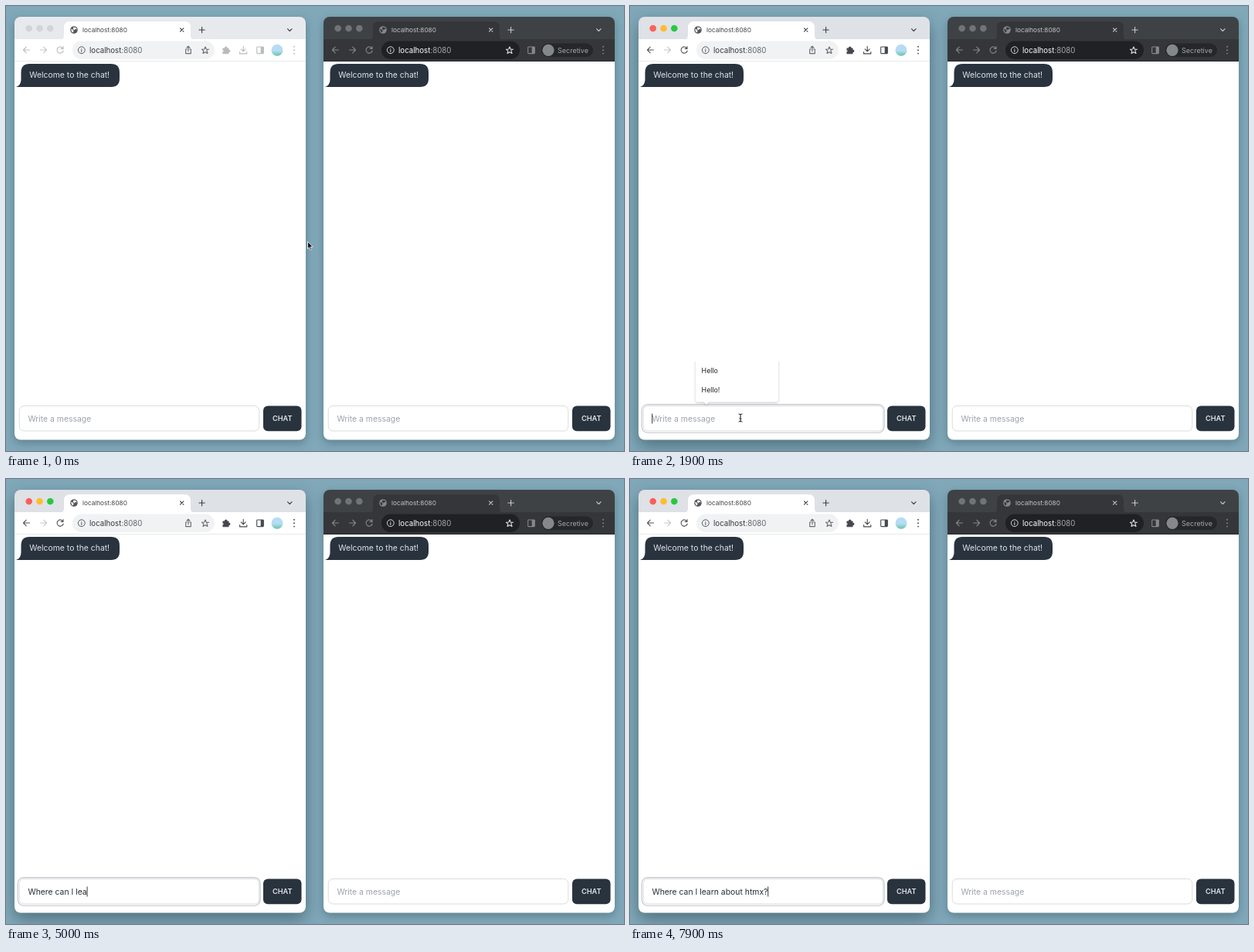
Recreate the animation shown at these times as an HTML page. Size 800 by 577 pixels, loop 8000 ms.

```html
<!DOCTYPE html>
<html lang="en">
<head>
<meta charset="utf-8">
<title>Chat demo</title>
<style>
  html, body { margin: 0; width: 100%; height: 100%; overflow: hidden; background: #80a8b9; }
  svg { display: block; width: 100%; height: 100%; }
  text { font-family: Inter, "Open Sans", sans-serif; white-space: pre; }
  .window { filter: drop-shadow(0 4px 6px rgba(0, 20, 30, .28)); }
  .window.active { filter: drop-shadow(0 8px 10px rgba(0, 20, 30, .38)); }
  .light { --strip: #e8e9ed; --tab: #fff; --bar: #fff; --pill: #f0f2f4; --ink: #3c4043; --url: #34373b;
           --nav: #b9bbbe; --dim: #c6c8cb; --dots: #d3d4d8; --line: #e4e5e7; --edge: #fff; }
  .light.active { --strip: #dee1e6; --nav: #50545a; --ext: #45494e; }
  .dark { --strip: #3f4245; --tab: #343639; --bar: #35363a; --pill: #202124; --ink: #c5c7ca; --url: #fff;
          --nav: #858789; --dim: #858789; --dots: #717477; --line: #292a2d; --edge: #5a5d60; }
  .icon { fill: none; stroke-width: 1.1; stroke-linecap: round; stroke-linejoin: round; }
</style>
</head>
<body>
<svg id="stage" viewBox="0 0 800 577" xmlns="http://www.w3.org/2000/svg"></svg>
<script>
const LOOP = 8000;
const MESSAGE = 'Where can I learn about htmx?';
const FOCUS_AT = 800, POPUP_AT = 1300, TYPE_AT = 2500;
// [time, characters typed]
const TYPING = [[TYPE_AT, 1], [3850, 10], [6050, 20], [7350, 28], [7600, 29]];
// [time, x, y]
const POINTER = [[100, 390.5, 305.5], [750, 131.5, 544], [1000, 131.5, 544], [1300, 143, 534]];

const label = (x, y, size, color, content, extra = '') =>
  `<text x="${x}" y="${y}" font-size="${size}" fill="${color}" ${extra}>${content}</text>`;
const icon = (x, y, d, color, extra = '') =>
  `<path class="icon" transform="translate(${x} ${y})" d="${d}" style="stroke:${color}" ${extra}/>`;
const box = (x, y, w, h, r, fill, extra = '') =>
  `<rect x="${x}" y="${y}" width="${w}" height="${h}" rx="${r}" style="fill:${fill}" ${extra}/>`;
const disc = (x, y, r, fill, extra = '') =>
  `<circle cx="${x}" cy="${y}" r="${r}" style="fill:${fill}" ${extra}/>`;

const SHAPES = {
  back: 'M4 0H-4M-.3-3.8L-4 0L-.3 3.8',
  forward: 'M-4 0H4M.3-3.8L4 0L.3 3.8',
  reload: 'M3.4-2.3A4.1 4.1 0 1 0 4 1M3.8-4.4V-1.6H1',
  star: 'M0-4.6L1.3-1.5L4.6-1.3L2-.9L2.1 .9L3 4L0 2.3L-3 4L-2.1 .9L-4.6-1.3L-1.3-1.5Z',
  share: 'M-1.8-1H-3.3V4.6H3.3V-1H1.8M0 1.8V-4.8M-2-2.8L0-4.8L2-2.8',
  download: 'M0-5V1.5M-3-1.4L0 1.6L3-1.4M-4.6 2.3V4.6H4.6V2.3',
  puzzle: 'M-4-2.5H-1.6C-2.2-5.2 1.6-5.2 1-2.5H3V-.3C5.4-.7 5.4 2.5 3 2V4.2H-4V1.9C-1.9 1.9-1.9-.4-4-.4Z',
  cross: 'M-2.2-2.2L2.2 2.2M2.2-2.2L-2.2 2.2',
  plus: 'M-3.7 0H3.7M0-3.7V3.7',
  chevron: 'M-2.8-1.3L0 1.5L2.8-1.3'
};

function toolbar(dark) {
  const nav = 'var(--nav)', ink = 'var(--ink)', ext = 'var(--ext, var(--nav))';
  const star = dark ? 252 : 258, panel = dark ? 280 : 329, pillEnd = dark ? 265 : 270;
  const dots = [52.8, 57.2, 61.6].map(y => disc(373, y, .95, dark ? nav : ext)).join('');
  const globe = disc(88, 31, 4.8, dark ? '#85888b' : '#54585d') +
    `<path d="M84.4 29.5L87 31L87.5 33L86 34.5Q84 32.5 84.4 29.5M87.5 27.4L90.5 28L91.7 30.2L89.5 30L88.5 31.5L86.8 29.5Z" style="fill:var(--tab)"/>`;
  const side = dark
    ? box(293, 48.5, 67, 17.5, 8.8, '#26272a') + disc(302, 57.3, 7.6, '#85888b') +
      label(314, 60.6, 9, '#a4a6a9', 'Secretive')
    : icon(236, 57, SHAPES.share, '#64686d', 'stroke-width="1"') +
      icon(285, 57.5, SHAPES.puzzle, ext, `style="fill:${ext}"`).replace('class="icon"', 'class="icon solid"') +
      icon(307.2, 57.3, SHAPES.download, ext) +
      disc(351, 57.3, 7.5, 'url(#avatar)');
  return box(11, 14, 377, 30, 0, 'var(--strip)') +
    `<path d="M69 44Q75 44 75 38V28Q75 20 83 20H231Q239 20 239 28V38Q239 44 245 44Z" style="fill:var(--tab)"/>` +
    box(11, 43, 377, 29, 0, 'var(--bar)') + box(11, 71.2, 377, .8, 0, 'var(--line)') +
    [29.7, 43.5, 57.3].map((x, i) => disc(x, 29, 4.3, 'var(--dots)', `class="lamp${i}"`)).join('') +
    globe + label(99, 34, 8.2, ink, 'localhost:8080') +
    icon(227.7, 31, SHAPES.cross, ink) + icon(253.6, 31, SHAPES.plus, ink) + icon(367.3, 31, SHAPES.chevron, ink) +
    icon(26.5, 57, SHAPES.back, nav) + icon(48.5, 57, SHAPES.forward, 'var(--dim)') + icon(70.2, 57, SHAPES.reload, nav) +
    box(86, 45.5, pillEnd - 86, 23.5, 11.7, 'var(--pill)') +
    disc(97.8, 57.2, 4.4, 'none', `stroke="${dark ? '#d5d7da' : '#55595e'}"`) +
    icon(97.8, 57.2, 'M0-.3V2M0-2V-1.9', dark ? '#d5d7da' : '#55595e') +
    label(108, 60.7, 9.7, 'var(--url)', 'localhost' + `<tspan fill="${dark ? '#a5a7aa' : '#62666b'}">:8080</tspan>`,
      dark ? 'style="fill:#fff"' : 'style="fill:#34373b"') +
    icon(star, 57.5, SHAPES.star, dark ? '#e0e1e3' : '#64686d') +
    box(panel - 4.3, 53, 8.6, 8.6, .8, 'none', `stroke-width="1.1" class="panel"`) +
    box(panel + .7, 53, 3.6, 8.6, 0, dark ? nav : ext) + side + dots;
}

const page = () =>
  box(11, 72, 377, 491, 0, '#fff') +
  `<path d="M13 105Q19 103 19.5 96V86Q19.5 75 30.5 75H136Q147 75 147 86V94Q147 105 136 105Z" fill="#29333e"/>` +
  label(30.3, 93, 10.4, '#e0e4e9', 'Welcome to the chat!') +
  box(17.2, 518.5, 310.6, 32.5, 6, '#fff', 'stroke="#d5d7da" stroke-width=".9"') +
  box(333, 518.4, 49.5, 32.8, 6, '#29333e') +
  label(357.7, 538.4, 9.2, '#e0e4e9', 'CHAT', 'font-weight="600" text-anchor="middle"');

const browser = (id, theme, x, content) =>
  `<g transform="translate(${x})"><g id="${id}" class="window ${theme}"><g clip-path="url(#frame)">` +
  toolbar(theme === 'dark') + page() + content + '</g></g></g>';

const placeholder = id => label(28.4, 538.8, 10.4, '#9ca1a9', 'Write a message', `id="${id}"`);

const field =
  box(15.2, 516.6, 314, 36.6, 8, 'none', 'id="focusRing" stroke="#c2c4ca" stroke-width="1.1"') +
  placeholder('hint') + label(28.4, 538.8, 10.4, '#252c36', '', 'id="typed"') +
  box(0, 528.5, .9, 13, 0, '#222', 'id="caret"') +
  `<g id="popup" style="filter:drop-shadow(0 1px 1.5px rgba(40,40,60,.28))">
    <path d="M85 459H192V511Q192 513.5 189.5 513.5H102.5L99 516.8L95.5 513.5H87.5Q85 513.5 85 511Z" fill="#fff"/>
    ${label(92.6, 475.7, 8.8, '#222', 'Hello')}${label(92.6, 500.5, 8.8, '#222', 'Hello!')}</g>
    <rect id="popupFade" x="82" y="455" width="113" height="6" fill="#fff"/>`;

const stage = document.getElementById('stage');
stage.innerHTML = `<defs>
  <clipPath id="frame"><rect x="11" y="14" width="377" height="548.5" rx="8"/></clipPath>
  <linearGradient id="avatar" x2="0" y2="1"><stop offset=".55" stop-color="#b5dcf2"/><stop offset="1" stop-color="#63c4a5"/></linearGradient>
  </defs><style>
  .light .panel { stroke: var(--ext, var(--nav)); } .dark .panel { stroke: var(--nav); }
  .solid { fill: var(--ext, var(--nav)); }
  .active .lamp0 { fill: #fe5f57 !important; } .active .lamp1 { fill: #febc2e !important; } .active .lamp2 { fill: #28c840 !important; }
  </style>` +
  browser('left', 'light', 0, field) + browser('right', 'dark', 400, placeholder('rightHint')) +
  `<circle id="clickRing" r="11.8" fill="#fff" fill-opacity=".25" stroke="#b9d3ee" stroke-width="1.5"/>
   <path id="arrow" d="M0 0V9.3L2.1 7.4L3.6 10.9L5.2 10.2L3.7 6.8H6.6Z" fill="#111" stroke="#fff" stroke-width=".8"/>
   <path id="beam" class="icon" d="M-2-5Q0-5 0-3.8Q0-5 2-5M0-4V4M-2 5Q0 5 0 3.8Q0 5 2 5M-1 1H1" stroke="#222"/>`;

const $ = id => document.getElementById(id);
const show = (id, visible) => $(id).style.display = visible ? '' : 'none';
const place = (id, x, y) => $(id).setAttribute('transform', `translate(${x} ${y})`);
const smooth = k => k * k * (3 - 2 * k);

// Interpolates every value column of a list of [time, ...values] keys.
function sample(keys, t, ease = k => k) {
  if (t <= keys[0][0]) return keys[0].slice(1);
  const next = keys.findIndex(key => key[0] > t);
  if (next < 0) return keys.at(-1).slice(1);
  const a = keys[next - 1], b = keys[next];
  const k = ease((t - a[0]) / (b[0] - a[0]));
  return a.slice(1).map((v, i) => v + (b[i + 1] - v) * k);
}

function draw(t) {
  const focused = t >= FOCUS_AT, typing = t >= TYPE_AT;
  const count = typing ? Math.floor(sample(TYPING, t)[0] + 1e-6) : 0;
  const popup = t >= POPUP_AT && !typing;
  const [x, y] = sample(POINTER, t, smooth);

  $('left').classList.toggle('active', focused);
  show('focusRing', focused);
  show('hint', !typing);
  $('typed').textContent = MESSAGE.slice(0, count);
  const width = count ? $('typed').getComputedTextLength() : 0;
  $('caret').setAttribute('x', 28.3 + width);
  show('caret', focused && (typing || Math.floor((t - FOCUS_AT) / 500) % 2 === 0));
  show('popup', popup);
  show('popupFade', popup);

  place('arrow', x, y);
  place('beam', x, y);
  place('clickRing', x + .3, y + .5);
  show('arrow', t < 1050);
  show('beam', t >= 1050 && !typing);
  show('clickRing', (t >= FOCUS_AT && t < 1000) || (t >= POPUP_AT && t < 1500));
}

function tick(now) {
  draw(now % LOOP);
  requestAnimationFrame(tick);
}
draw(0);
requestAnimationFrame(tick);
</script>
</body>
</html>
```
